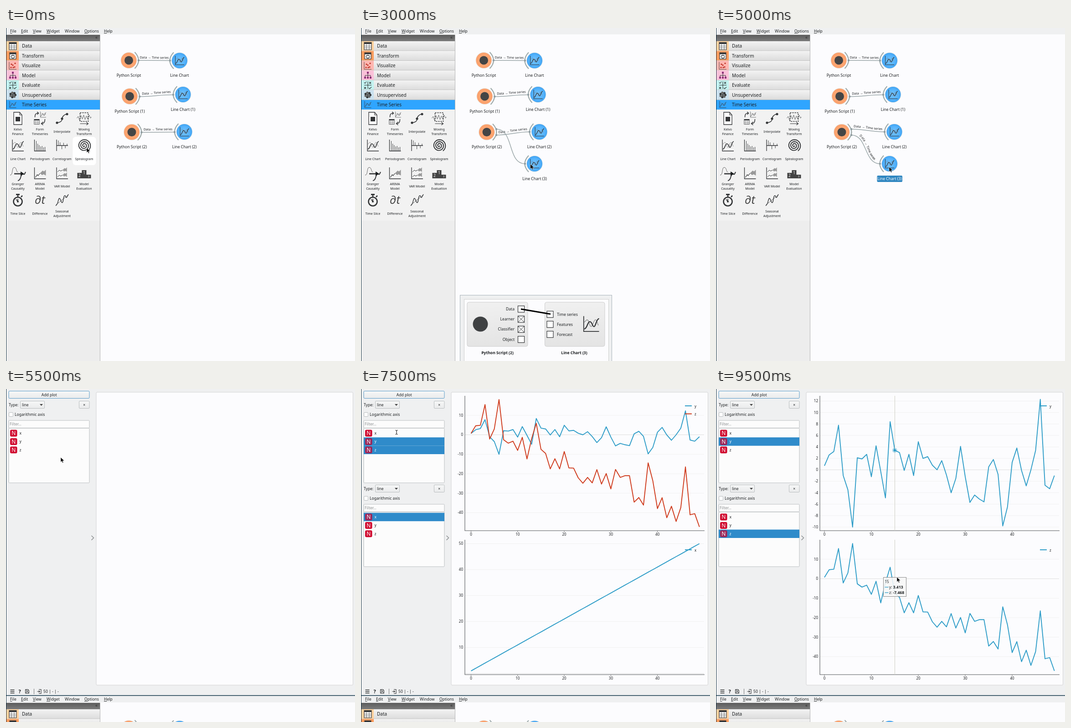
Animation of 766 by 731 pixels, one loop 10 s. Source, as an HTML page:

```html
<!DOCTYPE html>
<html lang="en">
<head>
<meta charset="utf-8">
<title>Time series workflow</title>
<style>
html, body { margin: 0; width: 100%; height: 100%; overflow: hidden; background: #eff0f1; }
svg { display: block; width: 100vw; height: 100vh; font-family: "Noto Sans", "Open Sans", sans-serif; fill: #1b1e20; }
.u { text-decoration: underline; }
</style>
</head>
<body>
<svg viewBox="0 0 766 731" xmlns="http://www.w3.org/2000/svg">
<defs>
  <linearGradient id="row" x2="0" y2="1"><stop stop-color="#f3f3f3"/><stop offset="1" stop-color="#dcdcdc"/></linearGradient>
  <linearGradient id="bar" x2="0" y2="1"><stop stop-color="#5c5c5c"/><stop offset="1" stop-color="#7c7c7c"/></linearGradient>
  <linearGradient id="btn" x2="0" y2="1"><stop stop-color="#f6f7f7"/><stop offset="1" stop-color="#eaebec"/></linearGradient>
  <linearGradient id="box" x2="0" y2="1"><stop stop-color="#f0f0f0"/><stop offset="1" stop-color="#e4e4e4"/></linearGradient>
  <radialGradient id="orange"><stop stop-color="#ffb182"/><stop offset=".7" stop-color="#ffa570"/><stop offset="1" stop-color="#f99f6a"/></radialGradient>
  <radialGradient id="blue"><stop stop-color="#74c4ff"/><stop offset=".7" stop-color="#55b3fc"/><stop offset="1" stop-color="#3fa3f2"/></radialGradient>
</defs>
<g id="view"></g>
</svg>
<script>
const STEP = 500, LOOP = 10000;
const DARK = '#333537', BLUE = '#2f9dc8', RED = '#cf3a1c', SELECT = '#2f8bca';
const MID = 'text-anchor="middle"', END = 'text-anchor="end"';

const Y = [.7, 2.6, 3.2, 7.8, -1, -3.5, -10, 2.1, 1.9, 2.7, -1.2, 4.2, -.3, -4.9, 8.4, 3.413, 3, -.1, 2.7, -1, 4.9, 2, 2.3, .8, 0,
  1.6, -.9, -4, -1.5, 4.1, -1.2, -5.7, -4.4, -5.1, -5.6, .5, 1.8, -.8, -9.8, -6.5, 1.3, 3.8, -.1, -2.8, 0, 3.4, 12.3, -2.7, -3.3, -1];
const Z = [.7, 4.6, 4.9, 15.5, -2.2, 3, 18.1, -2.6, -4.3, -3.3, -8, -1.3, -12.4, -2, 5.9, -7.468, -9.6, -17.5, -12.3, -17.5, -8.6, -17, -17.1, -22.1, -24.9,
  -21.9, -24.7, -17.9, -25.3, -19.9, -27.8, -17.8, -21.9, -21, -21, -34.6, -32.2, -36.1, -14.4, -23.6, -37.9, -32.3, -42.6, -36.7, -44.5, -37.4, -16.5, -41.1, -40.5, -47.3];
const data = { x: Y.map((_, i) => i + 1), y: Y, z: Z };

// Small markup helpers; text is centred vertically on y
const text = (x, y, s, size = 8.6, attr = '') =>
  `<text x="${x}" y="${y + size * .36}" font-size="${size}" ${attr}>${s}</text>`;
const rect = (x, y, w, h, fill, attr = '') =>
  `<rect x="${x}" y="${y}" width="${w}" height="${h}" fill="${fill}" ${attr}/>`;
const disc = (x, y, r, fill, attr = '') => `<circle cx="${x}" cy="${y}" r="${r}" fill="${fill}" ${attr}/>`;
const line = (d, color = DARK, w = 1.5, attr = '') =>
  `<path d="${d}" fill="none" stroke="${color}" stroke-width="${w}" ${attr}/>`;
const at = (x, y, s, k = 1) => `<g transform="translate(${x} ${y}) scale(${k})">${s}</g>`;
const range = (a, b, step) => Array.from({ length: Math.round((b - a) / step) + 1 }, (_, i) => a + i * step);

const axes = line('M-12-13V12H13', DARK, 1.3);
const table = rect(-8, -8, 16, 16, '#fff', `stroke="${DARK}" stroke-width="1.1"`) +
  rect(-8, -8, 16, 3.5, DARK) + line('M-8 0H8M-8 4H8M-3-4V8M3-4V8', DARK, .7);
const chart = axes + line('M-11-3L-7-7C-3-8-3 4 0 4S4-7 7-7 10 0 12 2', '#777', .8) +
  line('M-11 8C-6 7-6-4-2-4S2 5 5 4 8-8 13-9', DARK, 1.7);
const fan = '<path d="M0 0L6-6 9-4 13-8V5L8 2 5 4z" fill="#999"/>';
const bars = range(0, 6, 1).map(i => `M${-8 + i * 3.2} 12V${[-10, -4, -1, 2, 1, 4, 3][i]}`).join('');
const stems = range(0, 5, 1).map(i => `M${-8 + i * 3.8} 0V${[-11, -7, 8, -6, 6, -4][i]}`).join('');
const arc = range(0, 66, 1).map(i => {
  const a = i * .3, r = 1 + i * .205;
  return `${i ? 'L' : 'M'}${(r * Math.cos(a)).toFixed(1)} ${(r * Math.sin(a)).toFixed(1)}`;
}).join('');

const icons = {
  page: '<path d="M-9-13H4L9-7V14H-9z" fill="#fff" stroke="#333537" stroke-width="1.3"/>' +
    line('M4-13V-7H9', DARK, 1.2) + rect(-5, -3, 10, 10, DARK),
  form: at(7, -8, chart, .5) + at(-7, 8, table, .7) +
    line('M-11-2C-11-10-8-11-4-11M-6-14L-3-11-6-8M11 2C11 9 8 12 4 12M7 8L3 12 7 15', DARK, 1.5),
  curve: line('M-11 10C-2 9 0 6 0 2S3-8 11-9', DARK, 1.6) + disc(-11, 10, 2.6, DARK) + disc(0, 1, 2.6, DARK) + disc(11, -9, 2.6, DARK),
  moving: line('M-9-12H9V7H-9z', DARK, 1.6, 'stroke-dasharray="3 2"') +
    line('M-16 0l3-4 3 9 3-11 3 8 3-9 3 10 3-8 3 7 3-9 3 7 2-3', DARK, .7) + line('M-9 12H8M5 9L9 12 5 15', DARK, 1.2),
  chart,
  bars: axes + line(bars, DARK, .9),
  stems: line('M-12-13V12M-12 0H13', DARK, 1.3) + line(stems, DARK, .9),
  spiral: line(arc, DARK, 1.9),
  cause: line('M-17 4C-10 4-14-13-8-13S-4-2 0-3', '#666', 1) + line('M0 16C8 15 6 1 10 1S13 6 17-3', DARK, 1.9) +
    line('M-8 1H8', DARK, 2.6) + '<path d="M6-4L14 1 6 6z"/>',
  arima: axes + line('M-10 9L-6 3-4 5 0 0', DARK, 1.2) + fan,
  vars: axes + line('M-10-3L-6-7-3-5 1-7M-10 8L-6 4-3 6 1 4', DARK, 1) + at(1, -7, fan, .75) + at(1, 4, fan, .75),
  podium: '<path d="M-15 11V-1H-5V-7H5V3H15V11z" fill="#444"/>' +
    text(-10, 5, 2, 8, MID + ' fill="#fff"') + text(0, -1, 1, 9, MID + ' fill="#fff"') + text(10, 7, 3, 6, MID + ' fill="#fff"'),
  watch: disc(0, 3, 9.5, 'none', `stroke="${DARK}" stroke-width="2.6"`) + rect(-4, -14, 8, 3, DARK) +
    line('M0-11V-7M7-7L10-10', DARK, 2.5) + disc(0, 3, 2, DARK) + line('M0 3L-4-2M0 3V-3', DARK, 1.6),
  diff: text(0, -1, '∂t', 25, MID + ' font-style="italic" fill="#444"'),
  season: line('M-14 12C-8 9-9-3-6-4S-2 8 1 5 2-9 6-10 7 2 14-13', DARK, 1.4) + line('M-13 10L14-12', DARK, .9, 'stroke-dasharray="4 1"'),
  dots: range(0, 6, 1).map(i => disc(5.5 * Math.cos(i * .9), 5 * Math.sin(i * .9), 2.5, i % 2 ? '#666' : DARK)).join('') + disc(0, 0, 2.6, '#555'),
  loop: rect(-7, -7, 14, 14, '#fff', `stroke="${DARK}" stroke-width="1.2"`) + rect(-7, -7, 14, 3.5, DARK) +
    line('M-4 2C-3-2 2-2 4 1M4 2C3 6-2 6-4 3', DARK, 1.4),
  scatter: line('M-8-8V8H8', DARK, .8) + [[-4, 4], [0, -1], [-3, -3], [4, 3], [5, -5], [1, 4]].map(p => disc(...p, 1.7, '#c0392f')).join(''),
  tree: line('M0-5V0M-6 5V0H6V5M0 0V5', DARK, 1) + [[0, -6], [-6, 5], [0, 5], [6, 5]].map(p => rect(p[0] - 2, p[1] - 2, 4, 4, '#8e2f78')).join(''),
  tests: line('M-8-6l2 2 3-4M3-7l4 4M7-7l-4 4M-8 4l4 4M-4 4l-4 4M2 6l2 2 4-4M-8 0H8M0-8V8', DARK, 1.1)
};

const groups = [
  ['Data', '#ffd39f', table], ['Transform', '#ff9d5e', icons.loop], ['Visualize', '#ffb7b1', icons.scatter],
  ['Model', '#fac1d9', icons.tree], ['Evaluate', '#c3f3f0', icons.tests], ['Unsupervised', '#cae1ef', icons.dots]
];
const tools = [
  ['page', 'Kelvo', 'Finance'], ['form', 'Form', 'Timeseries'], ['curve', 'Interpolate'], ['moving', 'Moving', 'Transform'],
  ['chart', 'Line Chart'], ['bars', 'Periodogram'], ['stems', 'Correlogram'], ['spiral', 'Spiralogram'],
  ['cause', 'Granger', 'Causality'], ['arima', 'ARIMA', 'Model'], ['vars', 'VAR Model'], ['podium', 'Model', 'Evaluation'],
  ['watch', 'Time Slice'], ['diff', 'Difference'], ['season', 'Seasonal', 'Adjustment']
];
const menu = [['File', 9], ['Edit', 33], ['View', 59], ['Widget', 89], ['Window', 129], ['Options', 172], ['Help', 215]];

function sidebar(hover) {
  let s = rect(1, 0, 765, 14, '#eff0f1') + rect(1, 14, 206, 717, '#ededed') + rect(1, 179, 205, 244, '#f2f2f2') +
    rect(1, 15, 205, 14, 'url(#bar)') + text(196, 20, '«', 10, 'fill="#333"') + rect(206, 15, 1, 716, '#b5b5b5');
  for (const [name, x] of menu)
    s += text(x, 7, name === 'Window' ? name : `<tspan class="u">${name[0]}</tspan>${name.slice(1)}`);
  groups.forEach(([name, color, icon], i) => {
    const y = 29 + i * 21.45;
    s += rect(1, y, 205, 21, 'url(#row)') + rect(1, y, 27, 21, color) + rect(1, y + 20.6, 205, .9, '#b9b9b9') +
      at(15, y + 10.7, icon) + text(35, y + 10.7, name, 10);
  });
  s += rect(1, 158, 205, 21, '#2fa5ff') + at(15, 168, chart, .58) + text(35, 168, 'Time Series', 10);
  tools.forEach(([icon, a, b], i) => {
    const x = 26 + i % 4 * 48.5, r = i >> 2, y = [198, 258, 319, 378][r], ty = [227, 287, 347, 407][r];
    if (hover === i) s += rect(x - 25, y - 19, 51, 62, '#fff', 'rx="6"');
    s += at(x, y, icons[icon]);
    s += b ? text(x, ty - 5, a, 7, MID) + text(x, ty + 5, b, 7, MID) : text(x, ty, a, 7, MID);
  });
  return s;
}

function node(x, y, name, script, selected) {
  const d = script ? 1 : -1;
  let s = disc(x, y, 18, '#e9e9e9') + disc(x, y, 17, `url(#${script ? 'orange' : 'blue'})`) +
    (script ? disc(x, y, 9.5, '#454545') : at(x, y, chart, .78)) +
    line(`M${x + d * 13} ${y - 18}Q${x + d * 30} ${y} ${x + d * 13} ${y + 18}`, '#9fabab', 2.2);
  if (selected) s += rect(x - 27.5, y + 26, 55.5, 14, '#2f86c0', 'rx="2"');
  return s + text(x, y + 32.8, name, 8.6, MID + (selected ? ' fill="#fff"' : ''));
}

function link(id, x1, y1, x2, y2, label = true) {
  const d = Math.hypot(x2 - x1, y2 - y1) * .4;
  return line(`M${x1} ${y1}C${x1 + d} ${y1} ${x2 - d} ${y2} ${x2} ${y2}`, '#9aa6a8', 1.5, `id="${id}"`) +
    disc(x1, y1, 2.2, '#8f9ca0') + disc(x2, y2, 2.2, '#8f9ca0') +
    (label ? `<text font-size="7" dy="-4" ${MID}><textPath href="#${id}" startOffset="50%">Data → Time series</textPath></text>` : '');
}

function workflow({ hover, stage = 0, pull, selected }) {
  let s = rect(207, 14, 559, 717, '#fcfcfe') + sidebar(hover) + rect(0, 0, 1, 731, '#1f3a4c');
  s += node(269.5, 71, 'Python Script', true) + node(381, 71.5, 'Line Chart') +
    node(271.5, 150, 'Python Script (1)', true) + node(388.5, 146, 'Line Chart (1)') +
    node(276, 228.5, 'Python Script (2)', true) + node(391.5, 228, 'Line Chart (2)');
  if (stage) s += node(381, 298, 'Line Chart (3)', false, selected);
  s += link('a', 291, 71, 360, 71.5) + link('b', 293.5, 150.5, 367, 146.5);
  if (pull) s += link('c', 297, 235, 370, 228) + link('d', 297, 222, ...pull, false);
  else if (stage > 1) s += link('c', 297, 222, 370, 228) + link('d', 297, 235, 360, 298);
  else s += link('c', 297.5, 229, 370, 228.5);
  return s;
}

function dialog() {
  const edge = 'stroke="#cdcdcd" rx="4"';
  const tick = (x, y, on) => rect(x - 7, y - 7, 14, 14, '#fff', `stroke="${DARK}" stroke-width="1.2"`) +
    (on ? line(`M${x - 7} ${y - 7}l14 14m0-14l-14 14`, DARK, 1) : '');
  let s = rect(217.5, 586.5, 333, 150, '#eff0f1', 'stroke="#a9b4ba"') + rect(226.5, 595.5, 317, 140, '#fcfcfe', 'stroke="#d0d0d0"') +
    rect(233, 602, 133, 97, 'url(#box)', edge) + rect(403.5, 602, 131.5, 97, 'url(#box)', edge) +
    disc(262, 650, 16.5, '#3f4143') + at(505, 650, chart, 1.35);
  ['Data', 'Learner', 'Classifier', 'Object'].forEach((n, i) => {
    const y = 617 + i * 22.2;
    s += text(337, y, n, 8.6, END) + tick(351.5, y, i === 1 || i === 2);
  });
  ['Time series', 'Features', 'Forecast'].forEach((n, i) => {
    s += text(430, 628.5 + i * 22, n) + tick(415, 628.5 + i * 22);
  });
  return s + line('M351 617L416 628', '#000', 2.8) +
    text(299.5, 712.5, 'Python Script (2)', 8.6, MID + ' font-weight="700"') +
    text(468, 712.5, 'Line Chart (3)', 8.6, MID + ' font-weight="700"');
}

function controls(dy, picked) {
  const edge = 'stroke="#b4b8ba" stroke-width=".9" rx="1.5"';
  let s = text(6, 34.5, 'Type:') + rect(31.5, 26.5, 53, 16, 'url(#btn)', edge) + text(35, 34.5, 'line') +
    '<path d="M74 33h7l-3.5 4z" fill="#444"/>' + rect(160.5, 26.5, 22.5, 16, 'url(#btn)', edge) + text(171.7, 34.5, '×', 8.6, MID) +
    rect(6.5, 51.5, 9, 9, '#fcfcfc', edge) + text(19, 56, 'Logarithmic axis') +
    rect(6, 86, 177, 120, '#fcfcfc', edge) + rect(6, 69, 177, 16.5, '#fcfcfc', edge) + text(8, 77, 'Filter...', 8.6, 'fill="#8c8f91"');
  ['x', 'y', 'z'].forEach((n, i) => {
    const y = 97 + i * 18.4, on = picked.includes(n);
    if (on) s += rect(6, y - 9.2, 177, 18.4, SELECT);
    s += rect(9, y - 7.5, 15.5, 15, on ? '#9c2759' : '#d00b30', 'rx="3"') + text(16.8, y, 'N', 12, MID + ' fill="#fff"') +
      text(29.5, y, n, 8.6, on ? 'fill="#fff"' : '');
  });
  return at(0, dy, s);
}

// Pixels per unit, offset of zero from the top of a half-height plot, tick values
const scales = {
  x: [5.7, 293.5, range(0, 50, 10)],
  y: [12.57, 162.4, range(-10, 12, 2)],
  z: [4.275, 85.5, range(-40, 10, 10)]
};

function plot(names, top, tall, x0, dx) {
  const k = tall ? 2.068 : 1, base = top + (tall ? 612 : 296);
  const [unit, off, ticks] = scales[names.includes('z') ? 'z' : names[0]];
  const py = v => top + (off - v * unit) * k - (tall && names.includes('z') ? 2.5 : 0), px = i => x0 + i * dx;
  let s = '';
  for (const v of ticks) {
    s += line(`M228 ${py(v)}H753`, v ? '#f1f1f1' : '#dedede', 1);
    if (v || names[0] !== 'x') s += text(224, py(v), v, 8, END);
  }
  s += line(`M228 ${top}V${base}H754`, '#55585a', 1.1);
  for (const i of range(0, 40, 10)) s += line(`M${px(i)} ${base}v3`, '#777', 1) + text(px(i), base + 7.7, i, 8, MID);
  names.forEach((n, j) => {
    const color = j ? RED : BLUE, ly = top + 22 + j * 17.5;
    s += line('M' + data[n].map((v, i) => `${px(i).toFixed(1)} ${py(v).toFixed(1)}`).join('L'), color, 1.9, 'stroke-linejoin="round"') +
      line(`M711 ${ly}h15`, color, 2) + text(732, ly + 1, n, 8);
  });
  return s;
}

function tip() {
  const entry = (y, n) => line(`M370.5 ${y}h8`, BLUE, 1.3) + text(380, y, `${n}: <tspan font-weight="700">${data[n][15]}</tspan>`, 8.5);
  return line('M392.5 15V311M392.5 331V627', '#cfcfc4', 1) + disc(392.3, 134.4, 5.5, BLUE, 'opacity=".35"') + disc(392.3, 134.4, 2.6, BLUE) +
    rect(367.5, 413.5, 50, 42, '#f8f8f8', 'fill-opacity=".88" stroke="#8a8a8a"') +
    text(370.5, 423, '15', 8) + entry(435, 'y') + entry(447, 'z');
}

function plotter({ one, two, tip: showTip }) {
  let s = rect(0, 0, 766, 673, '#eff0f1') + rect(6, 4.5, 177, 16, 'url(#btn)', 'stroke="#5b9cc9" rx="2"') + text(94.7, 12.5, 'Add plot', 8.6, MID) +
    controls(0, one) + (two === undefined ? '' : controls(184, two)) +
    line('M187.5 322l5 4.8-5 4.8', '#8e9193', 1.5) + rect(198, 7, 563.5, 643, '#fcfcfe', 'stroke="#d3d3d3" rx="2"');
  const wide = two === 'x', x0 = wide ? 241.5 : 238, dx = wide ? 10.23 : 10.3;
  if (one) s += plot([...one], 15, !two, x0, dx);
  if (two) s += plot([...two], 331, false, x0, dx);
  if (showTip) s += tip();
  return s + line('M9.5 660.5h9M9.5 664h9M9.5 667.5h9', DARK, 1.4) + text(30, 664, '?', 11, MID + ' font-weight="700"') +
    line('M42.5 659.5h6l2 2v6.5h-8zM44.5 659.5v3h4v-3M44.5 668v-3.5h4v3.5', DARK, 1) +
    line('M61.5 658v12', '#777', 1) + line('M72 659.5h5v9h-5M68.5 664h5.5M72 662l2.2 2-2.2 2', DARK, 1.1) + text(82, 664, '50 | - | -') +
    at(0, 674, workflow({ stage: 2, selected: true })) + rect(0, 672, 766, 1.6, '#234457') + rect(0, 0, 1, 731, '#1f3a4c');
}

const arrow = (x, y) => at(x, y, '<path d="M0 0V10.5l2.5-2.2 1.7 3.9 1.8-.8-1.7-3.7H8z" fill="#000" stroke="#fff" stroke-width=".6"/>');
const beam = (x, y) => at(x, y, line('M-2.5-4.5Q0-4.5 0-3.5Q0-4.5 2.5-4.5M0-4V4M-2.5 4.5Q0 4.5 0 3.5Q0 4.5 2.5 4.5', '#000', 1));

// [start ms, cursor x, cursor y, scene options]
const steps = [
  [0, 177, 263, { hover: 7 }],
  [500, 28, 262, { hover: 4 }],
  [1000, 212, 284, { drag: true }],
  [1500, 381, 299, { drag: true }],
  [2000, 340, 272, { stage: 1 }],
  [2500, 340, 278, { stage: 1, pull: [340, 278] }],
  [3000, 372, 299, { stage: 1, pull: [360, 298], dialog: true }],
  [3500, 440, 640, { stage: 1, pull: [360, 298], dialog: true }],
  [4000, 452, 560, { stage: 2 }],
  [4500, 392, 330, { stage: 2 }],
  [5000, 380, 305, { stage: 2, selected: true }],
  [5500, 120, 150, { one: '' }],
  [6000, 60, 115, { one: 'y' }],
  [6500, 154, 38, { one: 'yz' }],
  [7000, 98, 14, { one: 'yz', two: '' }],
  [7500, 78, 95, { one: 'yz', two: 'x', beam: true }],
  [8000, 62, 115, { one: 'y', two: 'x' }],
  [8500, 60, 318, { one: 'y', two: 'z' }],
  [9000, 230, 370, { one: 'y', two: 'z' }],
  [9500, 397, 413, { one: 'y', two: 'z', tip: true }]
];

function scene([, x, y, o]) {
  return (o.one === undefined ? workflow(o) : plotter(o)) + (o.dialog ? dialog() : '') +
    (o.drag ? at(x + 24, y + 24, chart) : '') + (o.beam ? beam(x, y) : arrow(x, y));
}

const view = document.getElementById('view');
const start = performance.now();
let shown = -1;
function draw(now) {
  const i = Math.floor(Math.max(0, now - start) % LOOP / STEP);
  if (i !== shown) view.innerHTML = scene(steps[shown = i]);
  requestAnimationFrame(draw);
}
draw(start);
</script>
</body>
</html>
```
